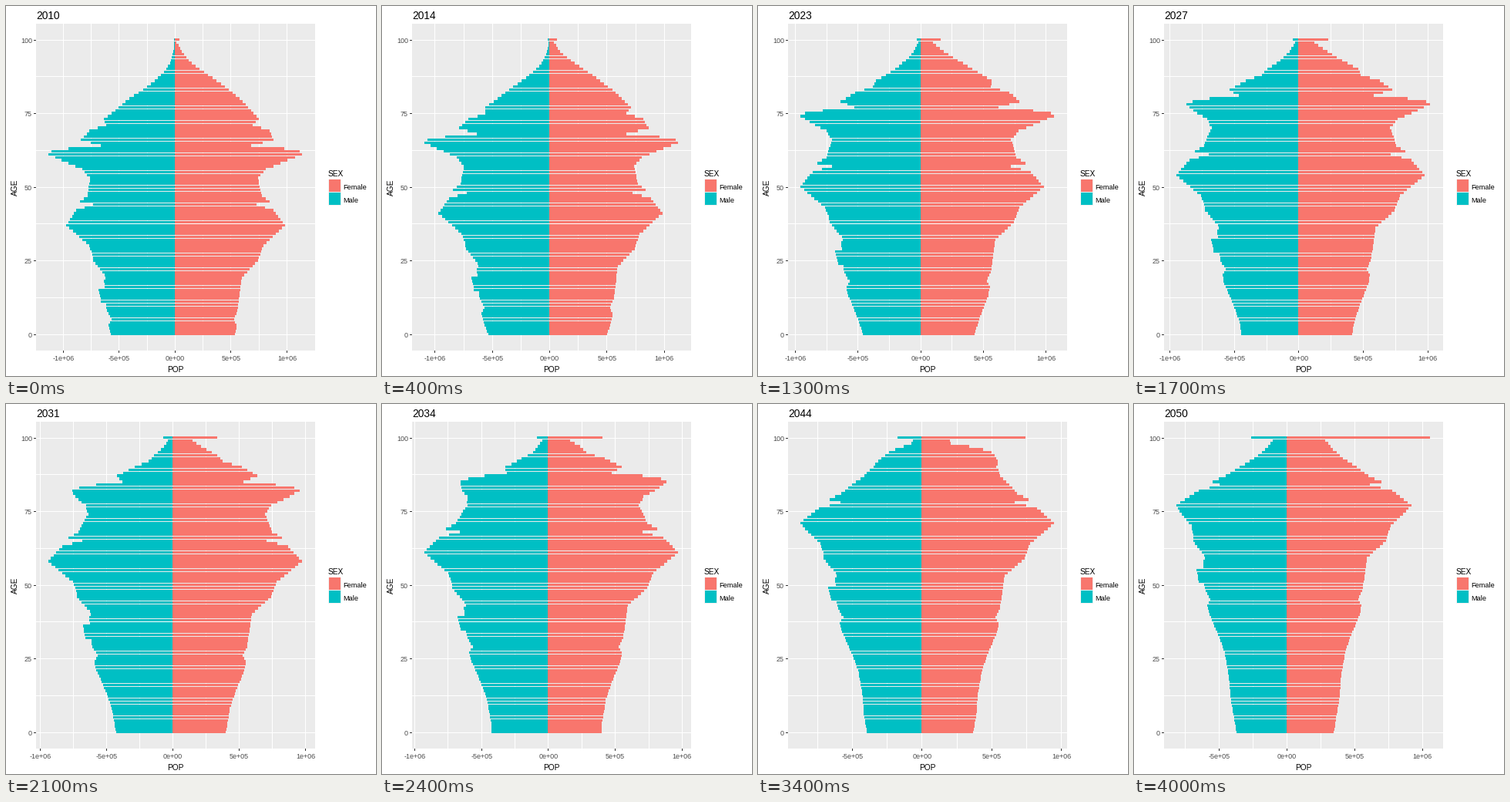
Recreate the animation shown at these times as a matplotlib script. Size 480 by 480 pixels, loop 4100 ms.

```python
import numpy as np
import matplotlib.pyplot as plt
from matplotlib.animation import FuncAnimation
from matplotlib.collections import PolyCollection

plt.rcParams["font.family"] = "Liberation Sans"

START, YEARS = 2010, 41
LEFT, RIGHT, TOP, BOTTOM = 38.8, 401, 22.465, 446.507
RED, TEAL, GREY, DARK = "#F8766D", "#00BFC4", "#4D4D4D", "#333333"

AGES = np.arange(101)
TIMES = np.arange(YEARS)


def curve(x, points):
    """Straight lines through a few (x, y) points."""
    return np.interp(x, *zip(*points))


# Women by age in the first year, in thousands: the turning points
women_0 = curve(AGES[:100], [
    (0, 541), (3, 553), (5, 528), (8, 562), (19, 598), (25, 745), (30, 790),
    (37, 986), (42, 886), (44, 728), (45, 845), (47, 776), (53, 743),
    (56, 815), (61, 1138), (62, 1120), (63, 976), (64, 686), (66, 886),
    (69, 845), (71, 700), (73, 752), (79, 610), (84, 452), (90, 224),
    (92, 150), (96, 62), (99, 17)])
men_per_woman = curve(AGES[:100], [
    (0, 1.062), (10, 1.08), (11, 1.15), (15, 1.16), (16, 1.065), (18, 1.065),
    (20, 1.01), (27, .963), (54, 1.02), (61, .994), (66, .946), (72, .86),
    (80, .7), (88, .4), (95, .2)])
girls = curve(TIMES, [(0, 541), (8, 469), (13, 432), (21, 403), (28, 392), (40, 350)])

# Everyone aged 100 or more shares the top bar
old_women = np.exp(curve(TIMES, [
    (t, np.log(n)) for t, n in ((0, 45), (8, 100), (13, 164), (21, 334),
                                (28, 533), (34, 747), (36, 757), (40, 1060))]))
old_men = old_women * (.152 + .0024 * TIMES)


def project(first, births, old, rate_65, growth):
    """Population by year and age; death rates grow with age, shrink with time."""
    age = AGES[:99] + .5
    rate = rate_65 * np.exp(growth * (age - 65))
    gain = curve(age, [(74, .026), (92, .01)])
    pop = np.zeros((YEARS, 101))
    pop[0, :100] = first
    pop[1:, 0] = births[1:]
    for t in range(1, YEARS):
        pop[t, 1:100] = pop[t - 1, :99] * np.exp(-rate * np.exp(-gain * (t - .5)))
    pop[:, 100] = old
    return pop * 1000


women = project(women_0, girls, old_women, .0043, .115)
men = project(women_0 * men_per_woman, girls * 1.058, old_men, .0114, .1)

fig = plt.figure(figsize=(480 / 72, 480 / 72), dpi=72, facecolor="white")
ax = fig.add_axes([0, 0, 1, 1])
ax.set_xlim(0, 480)
ax.set_ylim(480, 0)
ax.axis("off")


def box(x0, y0, x1, y1):
    return [(x0, y0), (x1, y0), (x1, y1), (x0, y1)]


def boxes(color, z, verts=()):
    shape = PolyCollection(list(verts), facecolors=color, edgecolors="none",
                           linewidths=0, antialiaseds=False, zorder=z)
    return ax.add_collection(shape, autolim=False)


def label(x, y, text, size, color="black", ha="left", va="baseline", **kw):
    return ax.text(x, y, text, fontsize=size, color=color, ha=ha, va=va, **kw)


STEP = (BOTTOM - TOP) / 110.99


def age_y(age):
    return BOTTOM - (age + 5.495) * STEP


def snap_y(y):
    return np.floor(y + .5927)


bar_top = snap_y(age_y(AGES) - .45 * STEP)
bar_bottom = snap_y(age_y(AGES) + .45 * STEP)

# Fixed parts
boxes("#EBEBEB", 0, [box(39, 23, 401, 447)])
rows = snap_y(age_y(np.arange(0, 101, 12.5)))
boxes("white", 1, [box(39, y, 401, y + 1) for y in rows])
boxes(DARK, 1, [box(36, y, 39, y + 1) for y in rows[::2]])
for a in range(0, 101, 25):
    label(34, age_y(a) + 4.3, str(a), 9, GREY, "right")
label(220, 475, "POP", 10.1, ha="center")
label(11.5, 235.5, "AGE", 10.1, ha="center", va="center", rotation=90)
label(418, 221, "SEX", 10.1)
boxes("#F2F2F2", 0, [box(418, 225, 435, 259)])
for y, name, color in ((225, "Female", RED), (242, "Male", TEAL)):
    boxes(color, 1, [box(419, y, 434, y + 16)])
    label(437, y + 13, name, 9.3)

# Moving parts
title = label(39, 17, "", 13.7)
columns = boxes("white", 1)
ticks = boxes(DARK, 1)
men_bars = boxes(TEAL, 2)
women_bars = boxes(RED, 2)
values = np.arange(-4, 5) * 250000
names = ["-1e+06", "-5e+05", "0e+00", "5e+05", "1e+06"]
x_labels = [label(0, 460, name, 9, GREY, "center") for name in names]


def draw(t):
    most_men, span = men[t].max(), men[t].max() + women[t].max()
    scale = (RIGHT - LEFT) / (1.1 * span)
    zero = LEFT + (most_men + .05 * span) * scale

    def bars(people):
        x0, ends = np.floor(zero), np.floor(zero + people * scale)
        return [box(min(x0, x), a, max(x0, x), b)
                for x, a, b in zip(ends, bar_top, bar_bottom)]

    men_bars.set_verts(bars(-men[t]))
    women_bars.set_verts(bars(women[t]))

    xs = zero + values * scale
    shown = (xs >= LEFT) & (xs < RIGHT)
    cols = np.floor(xs)
    columns.set_verts([box(x, 23, x + 1, 447) for x in cols[shown]])
    ticks.set_verts([box(x, 447, x + 1, 450) for x in cols[::2][shown[::2]]])
    for text, x, on in zip(x_labels, xs[::2], shown[::2]):
        text.set_x(x)
        text.set_visible(bool(on))
    title.set_text(str(START + t))
    return []


anim = FuncAnimation(fig, draw, frames=YEARS, interval=100,
                     repeat=True, repeat_delay=0, blit=False)
plt.show()
```
